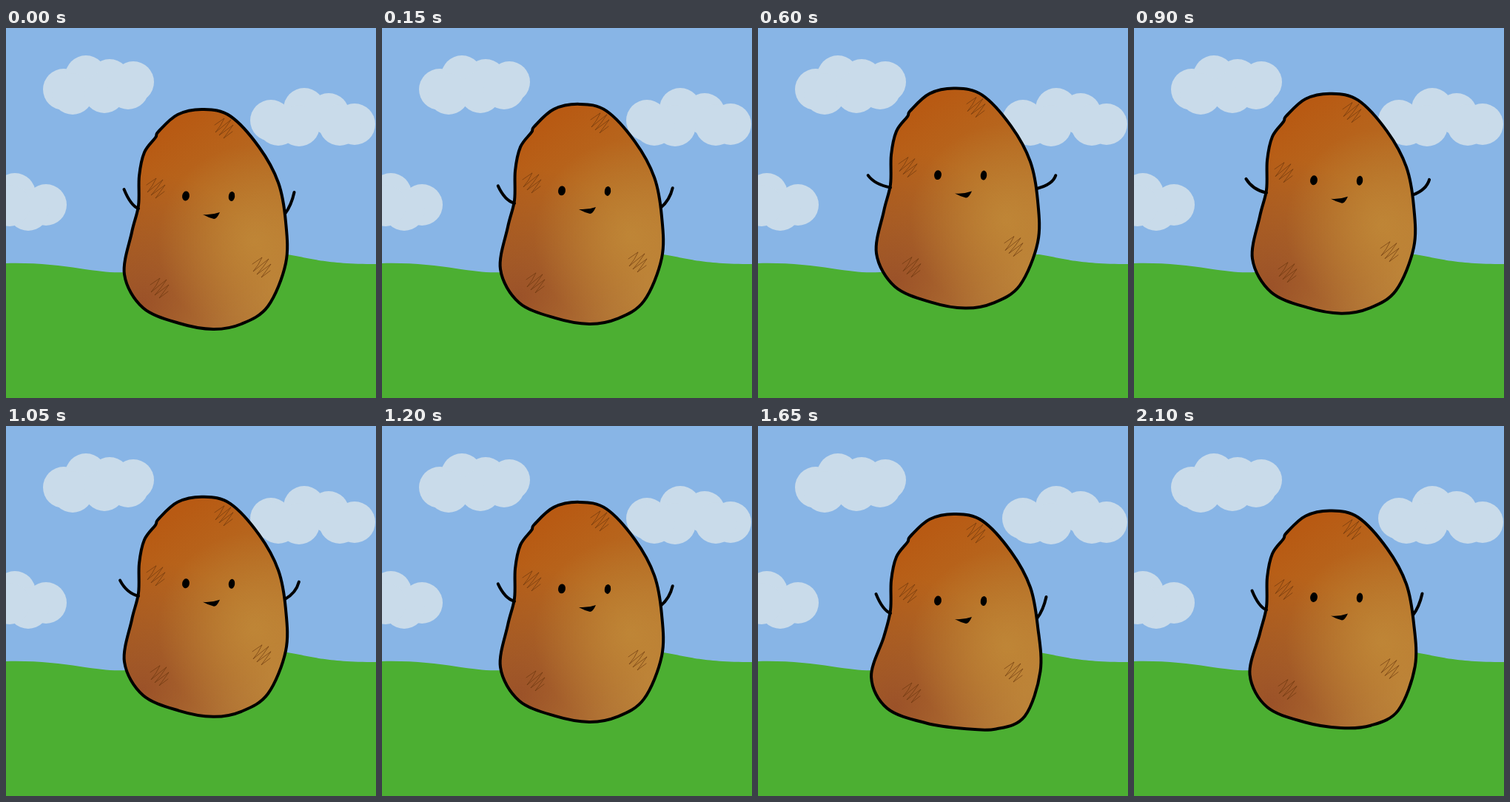
Write an HTML page with a canvas that moves like this. It is 500 by 500 pixels and loops after 2250 ms.

```html
<!DOCTYPE html>
<html lang="en">
<head>
<meta charset="utf-8">
<title>Jumping potato</title>
<style>
html, body { margin: 0; height: 100%; overflow: hidden; background: #88b5e6; }
canvas { display: block; width: 500px; height: 500px; }
</style>
</head>
<body>
<canvas id="stage" width="500" height="500"></canvas>
<script>
const ctx = document.getElementById('stage').getContext('2d');
const STEP = 150, STEPS = 15, PEAK = 4.5;

// key points of the potato, clockwise from the top
const outline = [
  [267, 110], [303, 119], [342, 161], [368, 209], [378, 262], [378, 318],
  [354, 376], [318, 400], [280, 407], [234, 399], [185, 378], [160, 333],
  [170, 276], [179, 240], [180, 200], [187, 168], [202, 148], [206, 140], [232, 117]
];

// centres of equal puffs
const puffs = [
  [78, 83], [108, 65], [140, 70], [172, 73], [90, 89], [133, 87], [165, 82],
  [358, 125], [403, 109], [436, 116], [471, 130], [396, 132], [451, 131], [368, 131],
  [12, 224], [54, 239], [30, 246], [5, 240]
];

const grass = new Path2D('M0 318C40 317 72 321 100 325S140 331 165 330C240 328 310 306 380 306C412 311 430 319 500 319V500H0Z');
const mouth = new Path2D('M266 252Q278 253 289 249Q285 258 281 258Q273 256 266 252Z');
const scribble = new Path2D('M-12-4L1-13Q-4-2-11 6Q1-4 10-11Q3 0-6 10Q5 2 13-4Q6 6 0 14L12 5');
const marks = [[294, 135], [202, 216], [345, 323], [207, 351]];

const linear = ctx.createLinearGradient(215, 140, 355, 355);
linear.addColorStop(0, '#b85a13');
linear.addColorStop(0.5, '#b66c23');
linear.addColorStop(1, '#ba8038');

function glow(x, y, r, rgb, alpha) {
  const g = ctx.createRadialGradient(x, y, 0, x, y, r);
  g.addColorStop(0, `rgba(${rgb},${alpha})`);
  g.addColorStop(1, `rgba(${rgb},0)`);
  return g;
}
const shade = glow(185, 370, 175, '150,76,40', 0.85);
const light = glow(335, 288, 130, '192,136,56', 0.85);

// Lower points spread sideways, the underside flattens.
function squashed([x, y], amount) {
  const w = amount * Math.max(0, (y - 280) / 127);
  return [x + (x - 288) * 0.13 * w, y + (Math.max(0, x - 288) * 0.25 - 7) * w];
}

function bodyPath(amount) {
  const n = outline.length;
  const pts = outline.map(p => squashed(p, amount));
  const at = i => pts[(i + n) % n];
  const path = new Path2D();
  path.moveTo(...pts[0]);
  for (let i = 0; i < n; i++) {
    const [a, b, c, d] = [at(i - 1), at(i), at(i + 1), at(i + 2)];
    path.bezierCurveTo(
      b[0] + (c[0] - a[0]) / 6, b[1] + (c[1] - a[1]) / 6,
      c[0] - (d[0] - b[0]) / 6, c[1] - (d[1] - b[1]) / 6, c[0], c[1]);
  }
  path.closePath();
  return path;
}

function fill(color, path) {
  ctx.fillStyle = color;
  ctx.fill(path);
}

function oval(x, y, rx, ry, tilt = 0) {
  ctx.beginPath();
  ctx.ellipse(x, y, rx, ry, tilt, 0, Math.PI * 2);
  ctx.fill();
}

function arm(x, y, bend, bx, by) {
  ctx.beginPath();
  ctx.moveTo(x, y);
  ctx.quadraticCurveTo(x + bend, 240, bx, by);
  ctx.stroke();
}

function scenery() {
  ctx.fillStyle = '#88b5e6';
  ctx.fillRect(0, 0, 500, 500);
  ctx.fillStyle = '#c9dbea';
  for (const [x, y] of puffs) oval(x, y, 28, 28);
  fill('#4caf32', grass);
}

// level: 4 at the top of the jump, 0 upright on the ground, -2 fully squashed
function potato(level) {
  const lift = Math.max(0, level), sink = Math.max(0, -level);
  ctx.save();
  ctx.translate(0, 4.5 * sink - 7.1 * lift);
  const body = bodyPath(sink / 2);
  for (const paint of [linear, shade, light]) fill(paint, body);

  ctx.lineCap = ctx.lineJoin = 'round';
  ctx.strokeStyle = 'rgba(100,50,10,.6)';
  ctx.lineWidth = 1;
  for (const [x, y] of marks) {
    ctx.save();
    ctx.translate(x, y);
    ctx.stroke(scribble);
    ctx.restore();
  }

  ctx.strokeStyle = ctx.fillStyle = '#000';
  ctx.lineWidth = 4;
  ctx.stroke(body);
  arm(159.5 - 2.7 * lift, 218 + 2.4 * lift, 9, 179, 244);
  arm(389.5 + 3.2 * lift, 222 + 1.4 * lift, -4, 377, 251 - 1.4 * lift);

  oval(243, 227, 4.9, 6.5, 0.15);
  oval(305, 227.5, 4.2, 6.5, 0.12);
  ctx.fill(mouth);
  ctx.restore();
}

const start = performance.now();
function frame() {
  const step = Math.floor((performance.now() - start) / STEP) % STEPS;
  const away = Math.abs(step - PEAK);
  scenery();
  potato(Math.max(-2, PEAK - Math.min(away, STEPS - away)));
  requestAnimationFrame(frame);
}
frame();
</script>
</body>
</html>
```
